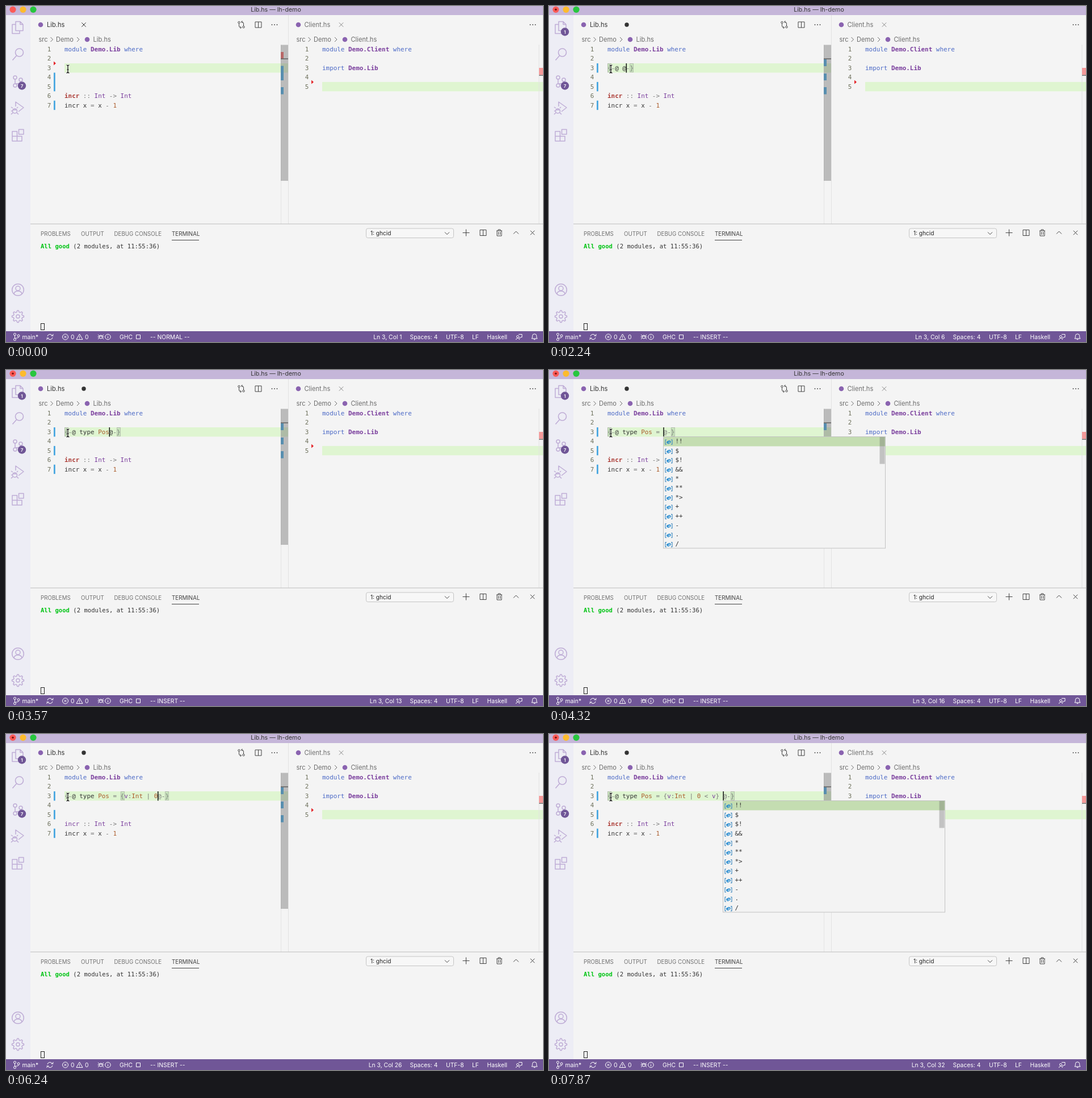
Recreate the animation shown at these times as an HTML page with a canvas. Size 946 px wide and 592 px high, loop 8000 ms.

```html
<!DOCTYPE html>
<html lang="en">
<head>
<meta charset="utf-8">
<title>Editor typing</title>
<style>
html, body { margin: 0; width: 100%; height: 100%; overflow: hidden; background: #f4f4f4; }
canvas { display: block; width: 946px; height: 592px; }
</style>
</head>
<body>
<canvas id="stage"></canvas>
<script>
const W = 946, H = 592, LOOP = 8000;
const cv = document.getElementById('stage');
const dpr = window.devicePixelRatio || 1;
cv.width = W * dpr;
cv.height = H * dpr;
const c = cv.getContext('2d');
c.scale(dpr, dpr);

const CW = 6.572, LH = 16.42;          // code cell
const MONO = '"DejaVu Sans Mono", monospace', UI = 'Inter, sans-serif';
const DARK = '#333', GREY = '#777', PURPLE = '#7a3e9d', BLUE = '#4b69c6',
      RED = '#aa3731', ORANGE = '#ab5a2a', VIOLET = '#705697', PALE = '#bfadd6',
      LINE = '#dff5d1', MARK = '#4fa9e0';

function rect(x, y, w, h, col) { c.fillStyle = col; c.fillRect(x, y, w, h); }
function disc(x, y, r, col) {
  c.fillStyle = col;
  c.beginPath();
  c.arc(x, y, r, 0, 7);
  c.fill();
}
function frame(x, y, w, h, col) {
  c.strokeStyle = col;
  c.lineWidth = 1;
  c.strokeRect(x + .5, y + .5, w - 1, h - 1);
}
function text(s, x, y, col, size, align = 'left', font = UI, weight = 400) {
  c.font = `${weight} ${size}px ${font}`;
  c.textAlign = align;
  c.fillStyle = col;
  c.fillText(s, x, y);
}
// d is an SVG path around the point (x, y)
function icon(x, y, d, col, lw = 1) {
  c.save();
  c.translate(x, y);
  c.strokeStyle = col;
  c.lineWidth = lw;
  c.lineJoin = 'round';
  c.stroke(new Path2D(d));
  c.restore();
}
const ring = (x, y, r) => `M${x + r} ${y}a${r} ${r} 0 1 0 ${-2 * r} 0a${r} ${r} 0 1 0 ${2 * r} 0`;
const baseline = n => 80 + (n - 1) * LH;
const rowTop = n => 68.2 + (n - 1) * LH;

// spans: [text, colour, weight]
function code(x, y, spans) {
  for (const [s, col, weight] of spans) {
    text(s, x, y, col, CW / .602, 'left', MONO, weight);
    x += s.length * CW;
  }
}

const CROSS = 'M-3.7-3.7L3.7 3.7M3.7-3.7L-3.7 3.7';
const SPLIT = 'M-5.5-5h11v10h-11zM0-5v10';
const CHEVRON = 'M-2-4L2 0L-2 4';
const BRANCH = ring(-3, -4.5, 2) + ring(-3, 4.5, 2) + ring(3.5, -2, 2) + 'M-3-2.5v5M3.5 0c0 3-4 1-6 3';
const BUG = ring(0, 0, 3) + 'M-3-2l-2-2M3-2l2-2M-3 0h-2.5M3 0h2.5M-3 2l-2 2M3 2l2 2M-3-1h6';

function titleBar(dirty) {
  rect(0, 0, W, 16, '#c5b6d9');
  disc(12, 6.3, 5.6, '#fc5b57');
  disc(30, 6.3, 5.6, '#fdbb2d');
  disc(48, 6.3, 5.6, '#28c63f');
  if (dirty) disc(12, 6.3, 1.8, '#7d1410');
  text('Lib.hs — lh-demo', 475.5, 10, '#333', 10.6, 'center');
}

function badge(x, y, s) {
  disc(x, y, 7.2, VIOLET);
  text(s, x, y + 3, '#fff', 8, 'center', UI, 600);
}

function activityBar(dirty) {
  rect(0, 16, 43, 557, '#ededf5');
  icon(21, 38, 'M-4-10.5h8l5 5v11h-13zM4-10.5v5h5M-4-5.5h-6v16h13v-5', PALE, 1.5);
  icon(21, 85, ring(2.5, -3, 7) + 'M-2.5 2.5L-9.5 10.5', PALE, 1.6);
  icon(20, 133, ring(-4, -7, 3) + ring(-4, 7, 3) + ring(6, -3, 3) + 'M-4-4v8M6 0c0 4-5 4-9 4', PALE, 1.5);
  icon(20, 180, 'M-3-3v-8L11-1L2 6' + ring(-4.5, 5, 4) + 'M-8.5 3h8M-8 0l-3-2M-1 0l2-2M-9 5h-2M-8 8l-3 3M-1 8l3 3', PALE, 1.5);
  icon(21, 228, 'M-10-7h8.5v17h-8.5zM-10 1.5h17v8.5h-8.5M1.5-10.5h8.5v8.5h-8.5z', PALE, 1.5);
  icon(21, 500, ring(0, 0, 10.3) + ring(0, -2.5, 4) + 'M-7 7.5c1-7 13-7 14 0', PALE, 1.5);
  let gear = '';
  for (let i = 0; i < 32; i++) {
    const a = (i - .5) * Math.PI / 16, r = i % 4 < 2 ? 10.5 : 7.8;
    gear += `${i ? 'L' : 'M'}${(r * Math.cos(a)).toFixed(2)} ${(r * Math.sin(a)).toFixed(2)}`;
  }
  icon(21, 547, gear + 'Z' + ring(0, 0, 3), PALE, 1.5);
  badge(28, 140.5, '7');
  if (dirty) badge(28, 45.5, '1');
}

function dots(x, y) { for (const d of [-4.5, 0, 4.5]) disc(x + d, y, .9, '#444'); }

function tabs(dirty) {
  const crumb = '#6c6c6c';
  disc(61, 33, 4.3, '#8a63b0');
  text('Lib.hs', 72, 37, DARK, 11.1);
  if (dirty) disc(137, 33, 3.7, '#333');
  else icon(137, 33, CROSS, '#333');
  icon(414.5, 33, ring(-4, -4, 1.7) + ring(4, 4, 1.7) + 'M-4-2v4q0 3 3 3h1M-2 3l2 2l-2 2M4 2v-4q0-3-3-3h-1M2-7l-2 2l2 2', '#444');
  icon(444.5, 33, SPLIT, '#444');
  dots(473, 33);
  disc(515, 33, 4.3, '#8a63b0');
  text('Client.hs', 525.5, 37, '#6f6f6f', 11.1);
  icon(590.5, 33, CROSS, '#888');
  dots(928, 33);
  for (const [x, name] of [[57.5, 'Lib.hs'], [511.5, 'Client.hs']]) {
    text('src', x, 62.7, crumb, 11.1);
    text('Demo', x + 30.5, 62.7, crumb, 11.1);
    icon(x + 23, 59, CHEVRON, crumb);
    icon(x + 69.5, 59, CHEVRON, crumb);
    disc(x + 85.5, 59, 4.3, '#8a63b0');
    text(name, x + 96, 62.7, crumb, 11.1);
  }
}

function gutter(x, count) {
  for (let n = 1; n <= count; n++) text(n, x, baseline(n), '#6d705b', CW / .602, 'right', MONO);
}
function wedge(x, y) {
  c.fillStyle = '#e5262b';
  c.beginPath();
  c.moveTo(x, y - 3.5);
  c.lineTo(x + 4, y);
  c.lineTo(x, y + 3.5);
  c.fill();
}

const BODY = '{-@ type Pos = {v:Int | 0 < v} ';
const inside = (i, a, b) => i >= a && i <= b;
function colourAt(i, ch, n) {
  if (i < n) {
    if (inside(i, 9, 11) || inside(i, 18, 20) || i === 24) return ORANGE;
    if (i === 16 || i === 28) return PURPLE;
  } else if (n > 14) return GREY;
  return '{}-:=|<'.includes(ch) ? GREY : DARK;
}

function bracketBox(i) {
  const x = 103 + i * CW, y = rowTop(3);
  rect(x, y + .5, CW, LH - 1.5, 'rgba(0,100,0,.1)');
  frame(Math.round(x), Math.round(y), 7, 16, '#b5bfae');
}

function leftPane(s) {
  const { n, tail, cur, mode, dirty } = s, edited = n >= 3, open = n >= 16 && n < 30;
  rect(103, rowTop(3), 394, LH, LINE);
  gutter(79.3, 7);
  const bar = (line, rows = 1) => rect(84, rowTop(line), 2.8, LH * rows, '#49a7e0');
  if (edited) { bar(3); bar(5); } else { bar(4, 2); wedge(84, 101); }
  bar(7);

  code(103, baseline(1), [['module ', BLUE], ['Demo.Lib', PURPLE, 700], [' where', BLUE]]);
  const line = BODY.slice(0, n) + tail;
  if (n) {
    bracketBox(open ? 15 : 0);
    bracketBox(line.length - 1);
  }
  [...line].forEach((ch, i) => code(103 + i * CW, baseline(3), [[ch, colourAt(i, ch, n)]]));
  code(103, baseline(6), [open ? ['incr', PURPLE] : ['incr', RED, 700],
    [' :: ', GREY], ['Int', PURPLE], [' -> ', GREY], ['Int', PURPLE]]);
  code(103, baseline(7), [['incr x ', DARK], ['= ', GREY], ['x ', DARK], ['- ', GREY], ['1', ORANGE]]);

  // overview ruler
  rect(484, 68, 1, 316, '#e5e5e5');
  if (edited) {
    rect(484, 94, 5, 12, MARK);
    rect(484, 119, 5, 12, MARK);
  } else {
    rect(484, 81, 5, 12, '#ef6a6a');
    rect(484, 105.5, 5, 25.5, MARK);
  }
  rect(484, 143, 5, 12.5, MARK);
  rect(484, 68.5, 13, 239.5, 'rgba(100,100,100,.4)');
  rect(484, 92.3, 13, 1.6, '#666');
  if (mode) rect(102.7 + cur * CW, rowTop(3), 1.5, LH, '#111');
}

function rightPane() {
  rect(497, 16, 1, 368, '#e3e3e3');
  rect(557, rowTop(5), 389, LH, LINE);
  gutter(533.3, 5);
  wedge(538, 134);
  code(557, baseline(1), [['module ', BLUE], ['Demo.Client', PURPLE, 700], [' where', BLUE]]);
  code(557, baseline(3), [['import ', BLUE], ['Demo.Lib', PURPLE, 700]]);
  rect(938.5, 68, 1, 316, '#e2e2e2');
  rect(939, 109, 7, 12.5, '#f59a9a');
  rect(939, 121.5, 7, 1.5, '#777');
}

function pointer() {
  const beam = 'M-2.5-7q2.5 0 2.5 2v10q0 2-2.5 2M2.5-7q-2.5 0-2.5 2M2.5 7q-2.5 0-2.5-2M-1.5 1h3';
  icon(109, 111, beam, 'rgba(255,255,255,.85)', 2.6);
  icon(109, 111, beam, '#000', 1.2);
}

const OPS = ['!!', '$', '$!', '&&', '*', '**', '*>', '+', '++', '-', '.', '/'];
function popup(kind, cur) {
  const x = Math.round(103.4 + cur * CW) - .5, y = 118, w = 391, words = kind === 'word';
  const h = words ? 16 : 196;
  rect(x, y, w, h, '#f3f3f3');
  rect(x, y, w, 16.4, '#c4ddb1');
  if (words) {
    text('abc', x + 3, y + 11.5, '#555', 8);
    code(x + 20.5, baseline(4), [['Int', '#9769dc', 700]]);
  } else {
    OPS.forEach((op, i) => {
      const mid = y + 9 + i * LH;
      icon(x + 9.5, mid, 'M-4-4h-2v8h2M4-4h2v8h-2', '#3b86bd', 1.1);
      icon(x + 9.5, mid, 'M-3.2 1.4L1-2.5L3.2-1.4V.9L-1 3L-3.2 1.4V-.6L1-2.5M-3.2-.6L-1 .6L3.2-1.4M-1 .6V3', '#1583cf', 1);
      code(x + 21, baseline(4 + i), [[op, DARK]]);
    });
    rect(x + w - 10, y, 9, 47.5, 'rgba(100,100,100,.35)');
  }
  c.strokeStyle = '#c3c3c3';
  c.lineWidth = 1;
  c.strokeRect(x, y - .5, w, h + .5);
}

function panel() {
  rect(43, 383.5, W - 43, 1, '#bdbdbd');
  [['PROBLEMS', 61], ['OUTPUT', 132], ['DEBUG CONSOLE', 190.5], ['TERMINAL', 292]]
    .forEach(([s, x], i) => text(s, x, 404.5, i === 3 ? '#424242' : '#707070', 9.75));
  rect(292, 412, 48, 1, '#444');
  c.beginPath();
  c.roundRect(634.5, 392, 154, 16.5, 3);
  c.fillStyle = '#f7f7f7';
  c.fill();
  c.strokeStyle = '#c4c4c4';
  c.lineWidth = 1;
  c.stroke();
  text('1: ghcid', 642, 404.3, '#222', 10.1);
  icon(777, 400.5, 'M-4-2L0 2L4-2', '#444');
  icon(810.5, 399.5, 'M-6 0h12M0-6v12', '#444');
  icon(840.5, 399.5, SPLIT, '#444');
  icon(869, 399.5, 'M-5-3.5h10M-2-3.5v-2h4v2M-4-3.5v9h8v-9M-1.5-1.5v5M1.5-1.5v5', '#444');
  icon(898.5, 399.5, 'M-4.5 2L0-2.5L4.5 2', '#444');
  icon(927.5, 399.5, CROSS, '#444');
  text('All good', 61, 427, '#00c414', 10.58, 'left', MONO, 700);
  text('(2 modules, at 11:55:36)', 61 + 9 * 6.37, 427, DARK, 10.58, 'left', MONO);
  frame(61, 559, 7, 12, '#222');
}

function statusBar(cur, mode) {
  const put = (s, x, align) => text(s, x, 586.7, '#fff', 10.35, align);
  const sign = (x, d) => icon(x, 583, d, '#fff', 1);
  rect(0, 573, W, 19, VIOLET);
  sign(18.5, BRANCH);
  put('main*', 28.5);
  sign(77.5, 'M-4.5-1A4.5 4.5 0 0 1 4-2M4.5 1A4.5 4.5 0 0 1-4 2M2-2h4M4-2L6-5M-2 2h-4M-4 2L-6 5');
  sign(104.5, ring(0, 0, 5) + 'M-2-2L2 2M2-2L-2 2');
  put('0', 114);
  sign(129.5, 'M0-5L5.5 4.5h-11zM0-1.5v3M0 2.5v1');
  put('0', 139);
  sign(167, BUG);
  sign(179.5, ring(0, 0, 4.7) + 'M0-.5v3M0-2.5v1');
  put('GHC', 200);
  sign(233, 'M-3.5-3.5h7v7h-7z');
  put(mode ? '-- INSERT --' : '-- NORMAL --', 254);
  put(`Ln 3, Col ${cur + 1}`, 697.5, 'right');
  put('Spaces: 4', 711.5);
  put('UTF-8', 775);
  put('LF', 821);
  put('Haskell', 847.5);
  sign(904, 'M-1-4.5h6v5h-2l-2 2v-2' + ring(-2.5, -.5, 2) + 'M-5.5 5c0-3.5 6-3.5 6 0');
  sign(931, 'M-5 3h10l-1.3-2v-2.5a3.7 3.7 0 0 0-7.4 0v2.5zM-1.3 3.5a1.3 1.3 0 0 0 2.6 0');
}

// time, typed characters, text after them, popup, cursor offset
const steps = [[0, 0, ''], [450, 0, ''], [750, 1, '}'], [895, 2, '}'], [1040, 3, '}'],
  [1340, 4, '}'], [1490, 4, '}', 'ops'], [1640, 4, '@}', '', 1], [1940, 4, '@-}', '', 2],
  [2240, 4, '@-}', '', 1], [2390, 4, '@-}']];
function type(start, first, last, gap = 147.5) {
  for (let n = first; n <= last; n++) {
    steps.push([Math.floor((start + (n - first) * gap) / 10) * 10, n, '@-}', n === 20 || n === 21 ? 'word' : '']);
  }
}
function suggest(t, n) { steps.push([t, n, '@-}', 'ops']); }
type(2690, 6, 13);
type(4020, 14, 15, 150);
suggest(4320, 15);
type(4460, 16, 16);
type(4760, 17, 18, 150);
type(5210, 19, 24);
suggest(6090, 24);
type(6240, 25, 27, 150);
type(6840, 28, 29, 150);
type(7580, 30, 31);
suggest(7870, 31);

function stateAt(t) {
  const [, n, tail, pop, shift = 0] = steps.findLast(s => s[0] <= t);
  return { n, tail, pop, cur: n + shift, mode: t >= 450, dirty: n > 0 };
}

function draw(t) {
  const s = stateAt(t);
  rect(0, 0, W, H, '#f4f4f4');
  titleBar(s.dirty);
  activityBar(s.dirty);
  tabs(s.dirty);
  leftPane(s);
  rightPane();
  if (s.pop) popup(s.pop, s.cur);
  pointer();
  panel();
  statusBar(s.cur, s.mode);
}

const t0 = performance.now();
function tick() {
  draw((performance.now() - t0) % LOOP);
  requestAnimationFrame(tick);
}
tick();
</script>
</body>
</html>
```
